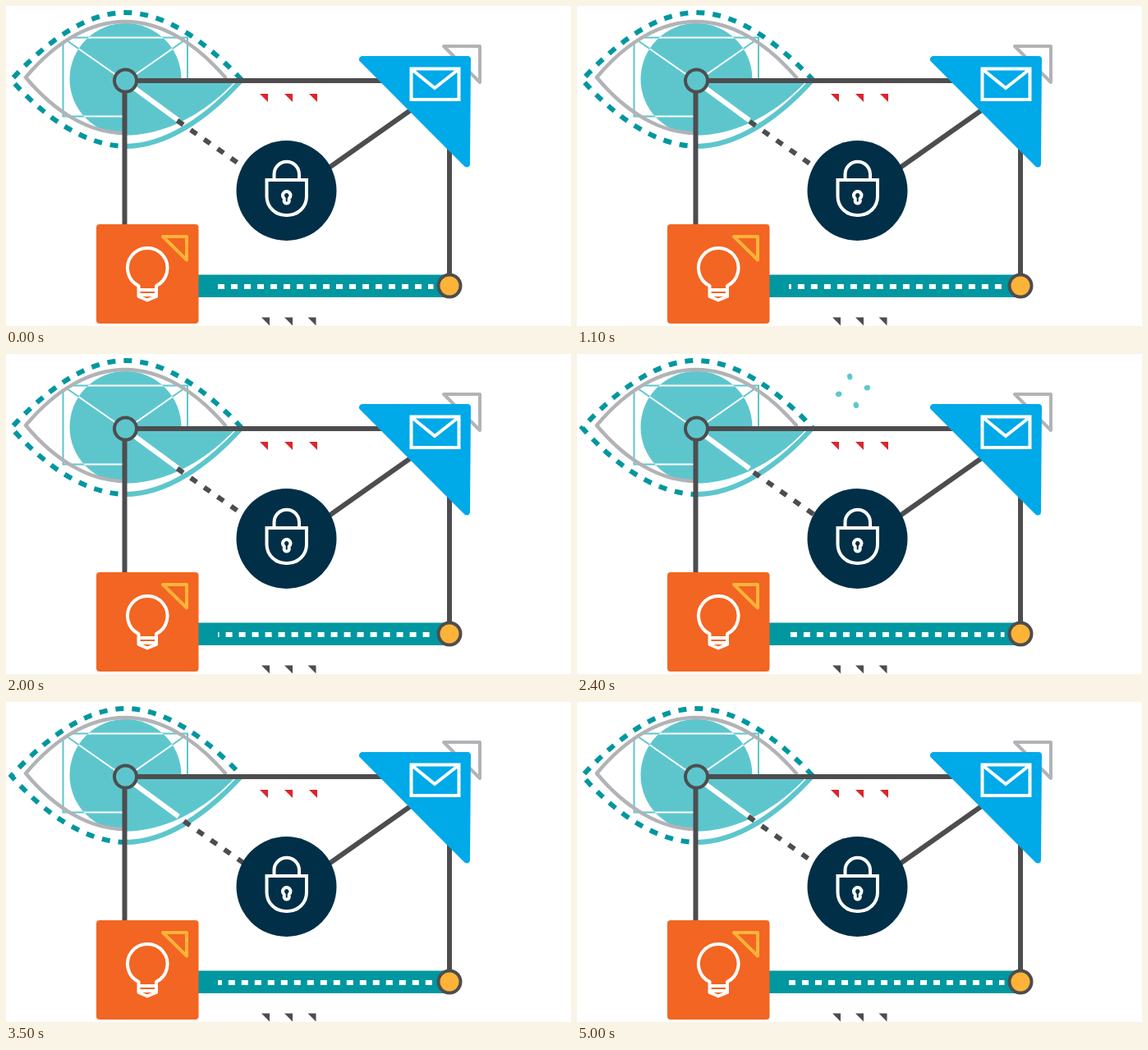
Recreate the animation shown at these times as an HTML page. Size 688x390 px, loop 5100 ms.

```html
<!DOCTYPE html>
<html lang="en">
<head>
<meta charset="utf-8">
<title>Connected ideas</title>
<style>
html, body { margin: 0; width: 100%; height: 100%; overflow: hidden; background: #fff; }
svg { display: block; }
.line { fill: none; stroke: #4d4d4f; stroke-width: 6; }
.icon { fill: none; stroke: #fff; stroke-width: 4; stroke-linejoin: round; }
.sharp { stroke-linejoin: miter; }
</style>
</head>
<body>
<svg width="688" height="390" viewBox="0 0 688 390">
  <defs>
    <clipPath id="iris"><circle cx="145.500" cy="89" r="68"/></clipPath>
    <path id="guides" d="M69.500 44V134.500H145M77 38.500H221V91M74 42L145.500 92L217 42"/>
    <path id="flag" d="M0 0H10V10Z"/>
  </defs>

  <!-- Eye -->
  <circle cx="145.500" cy="89" r="68" fill="#5dc6cd"/>
  <path d="M145 91H287L279 92C238 135 190 157.500 145 157.500Z" fill="#5dc6cd"/>
  <g fill="none">
    <use href="#guides" stroke="#5dc6cd" stroke-width="2"/>
    <use href="#guides" stroke="#fff" stroke-width="2" clip-path="url(#iris)"/>
    <path d="M267 89V87C230 44 188 19 145 19S60 44 24 87C60 130 102 155 145 155"
          stroke="#b1b3b6" stroke-width="4.500" stroke-linejoin="round"/>
    <path d="M145 171C195 171 245 136 286 91" stroke="#5dc6cd" stroke-width="6"/>
    <path id="lid" d="M287 90C245 45 195 8 145 8S45 48 6.500 90C45 134 95 170 145 171"
          stroke="#0097a0" stroke-width="6" stroke-dasharray="10"/>
    <path d="M145.500 92L210 139.500" stroke="#fff" stroke-width="6"/>
  </g>

  <!-- Connections -->
  <path id="link" class="line" d="M208.500 139.500L294 199.500" stroke-dasharray="9 11"/>
  <path class="line" d="M144.500 268V91H460M392 198L494 126M540 160V330"/>
  <circle cx="145.500" cy="91" r="13.500" fill="#5dc6cd" stroke="#4d4d4f" stroke-width="4"/>
  <path d="M230 327.500H540V355H230Z" fill="#0097a0"/>
  <path id="belt" d="M258 342H520.500" stroke="#fff" stroke-width="6" stroke-dasharray="8"/>
  <circle cx="540" cy="341" r="13.500" fill="#fdb338" stroke="#4d4d4f" stroke-width="4"/>

  <!-- Mail -->
  <path d="M533 49H577V93Z" fill="none" stroke="#b1b3b6" stroke-width="4" stroke-linejoin="round"/>
  <path d="M434 65H562L561 192.500Z" fill="#00a9e8" stroke="#00a9e8" stroke-width="8" stroke-linejoin="round"/>
  <path class="icon sharp" d="M493.500 76.500H551.500V114H493.500ZM495 78L522 100L550 78"/>

  <!-- Lock -->
  <circle cx="341.500" cy="225" r="61" fill="#002f47"/>
  <path class="icon sharp" d="M317.500 212H366V232A23 23 0 0 1 343 255H340.500A23 23 0 0 1 317.500 232ZM326.500 212V205A15.250 15.250 0 0 1 357 205V212"/>
  <path class="icon" stroke-width="3.500" d="M338.700 234.500A4.750 4.750 0 1 1 344.700 234.500V238A3 2.500 0 0 1 338.700 238Z"/>

  <!-- Idea -->
  <rect x="110" y="266" width="124.500" height="121" rx="4" fill="#f26522"/>
  <path d="M191 281H220V309.500Z" fill="none" stroke="#fdb338" stroke-width="4" stroke-linejoin="round"/>
  <path class="icon" d="M161.500 346V341A24.300 24.300 0 1 1 183 341V346ZM161.500 346V354L172 358.500L183 354V346M161.500 352H183"/>

  <g fill="#d9272d">
    <use href="#flag" x="309" y="107"/><use href="#flag" x="339" y="107"/><use href="#flag" x="369" y="107"/>
  </g>
  <g fill="#4d4d4f">
    <use href="#flag" x="311" y="379.500"/><use href="#flag" x="339" y="379.500"/><use href="#flag" x="367.500" y="379.500"/>
  </g>
  <g id="bursts"></g>
</svg>
<script>
const LOOP = 5100, STEP = 100, BURST_TIME = 800;
const byId = id => document.getElementById(id);
const lid = byId('lid'), link = byId('link'), belt = byId('belt');

const bursts = [
  { x: 617, y: 120, color: '#00a9e8', start: 100 },
  { x: 336, y: 45, color: '#5dc6cd', start: 2200 },
  { x: 73, y: 234, color: '#f26522', start: 3700 }
];

for (const burst of bursts) {
  burst.group = document.createElementNS('http://www.w3.org/2000/svg', 'g');
  burst.group.setAttribute('fill', burst.color);
  byId('bursts').append(burst.group);
}

function drawBurst({ x, y, start, group }, time) {
  const p = (time - start) / BURST_TIME;
  const visible = p > 0 && p < 1;
  group.style.display = visible ? '' : 'none';
  if (!visible) return;
  const radius = 30.7 * (1 - (1 - p) ** 3);
  group.setAttribute('opacity', Math.min(1, 1.3 * (1 - p)));
  group.innerHTML = [0, 90, 180, 270].map(angle =>
    `<ellipse cx="${radius}" rx="3.8" ry="3.2" transform="translate(${x} ${y}) rotate(${angle - 12.5})"/>`
  ).join('');
}

function draw(now) {
  const time = Math.floor(now % LOOP / STEP) * STEP;
  const seconds = time / 1000;
  lid.style.strokeDashoffset = 20 * seconds;
  link.style.strokeDashoffset = -20 * seconds;
  belt.style.strokeDashoffset = 16 * 1.2 * seconds;
  bursts.forEach(burst => drawBurst(burst, time));
  requestAnimationFrame(() => draw(performance.now() - origin));
}

const origin = performance.now();
draw(0);
</script>
</body>
</html>
```
